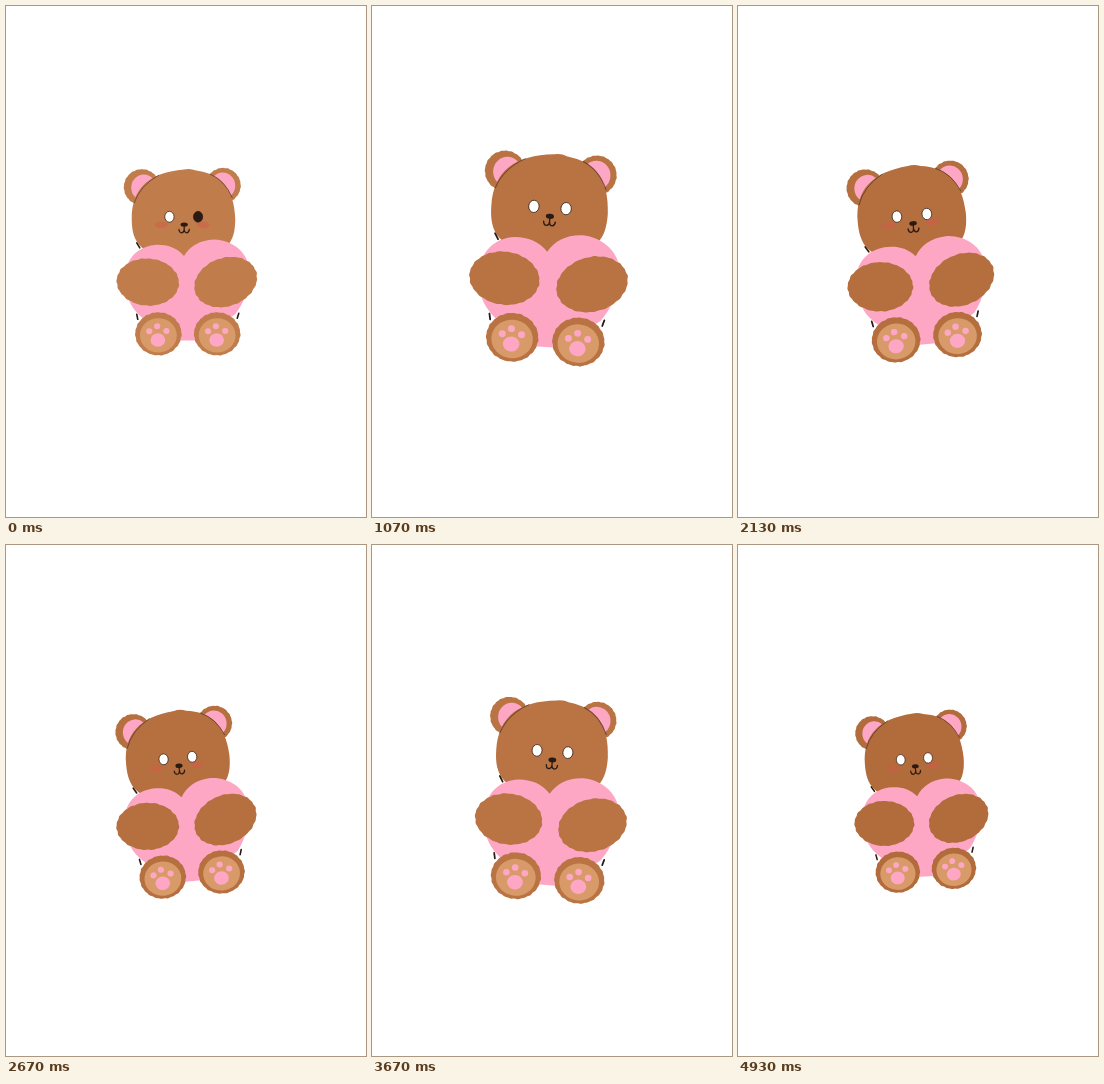
An HTML page that plays this animation: 360x511 px, repeating every 5000 ms.

```html
<!DOCTYPE html>
<html lang="en">
<head>
<meta charset="utf-8">
<title>Bear with a heart</title>
<style>
html, body { margin: 0; width: 100%; height: 100%; overflow: hidden; background: #fff; }
svg { display: block; width: 100vw; height: 100vh; }
</style>
</head>
<body>
<svg id="stage" viewBox="0 0 360 511">
  <g id="bear"></g>
</svg>
<script>
const LOOP = 5000, FPS = 15;
const BEAT = 888, FIRST_BEAT = 180;
const CX = 180, CY = 255.5;
const PINK = '#fda7c5', DARK = '#2a1a14';
const bear = document.getElementById('bear');

// time, rotation, x shift, y shift, warmth of the brown
const poses = [
  [0, 0, 0, 0, 1],
  [180, 0, 0, 0, 0.7],
  [600, 4, 1, -1.3, 0],
  [1070, 4, -3, -3.5, 0.5],
  [1470, -3.5, -2, -2.8, 0.8],
  [1960, -5, -2.5, 2.5, 0.4],
  [2130, -5, 2, -1, 0.2],
  [2670, -5, -2, 2, 0.3],
  [2850, -5, -1.4, 3, 0.3],
  [3200, -2, 2.4, 2.2, 0.2],
  [3730, 5, -1, -1, 0.6],
  [4200, 3, 2, -4.5, 0.8],
  [4620, 5, -4.6, 1, 0.4],
  [4930, -6.2, 3, 0.8, 0],
  [5000, 0, 0, 0, 1]
];

function add(tag, attrs) {
  const node = document.createElementNS('http://www.w3.org/2000/svg', tag);
  for (const key in attrs) node.setAttribute(key, attrs[key]);
  bear.append(node);
  return node;
}

const ellipse = (cx, cy, rx, ry, fill, more) => add('ellipse', { cx, cy, rx, ry, fill, ...more });
const shape = (d, fill, more) => add('path', { d, fill, ...more });
const line = (d, width, more) =>
  shape(d, 'none', { stroke: DARK, 'stroke-width': width, 'stroke-linecap': 'round', ...more });

// Ellipse with a slightly furry rim
function furry(cx, cy, rx, ry, tilt) {
  const a = tilt * Math.PI / 180, points = [];
  for (let i = 0; i < 120; i++) {
    const p = i * Math.PI / 60;
    const k = 1 + 0.009 * Math.sin(p * 23) + 0.006 * Math.sin(p * 14 + 1);
    const x = rx * k * Math.cos(p), y = ry * k * Math.sin(p);
    points.push((cx + x * Math.cos(a) - y * Math.sin(a)).toFixed(2) + ' ' +
                (cy + x * Math.sin(a) + y * Math.cos(a)).toFixed(2));
  }
  return shape('M' + points.join('L') + 'Z', 'currentColor');
}

function foot(x) {
  furry(x, 327.5, 23, 21.4, 0);
  ellipse(x, 329, 18.3, 17, '#d99a69');
  ellipse(x - 0.5, 333.5, 7.3, 6.7, PINK);
  ellipse(x - 9, 325, 3.1, 3, PINK);
  ellipse(x - 1.2, 320, 3.1, 3, PINK);
  ellipse(x + 8, 324.7, 3.1, 3, PINK);
}

// Ears and head
furry(136, 181.5, 17.8, 17.8, 0);
ellipse(138, 182, 12.5, 13, PINK);
furry(217, 179.8, 17.4, 17.4, 0);
ellipse(216.5, 180, 12.5, 13, PINK);
shape('M178 164Q184 162.5 190 165C214 168 228 182 229 213C229 236 222 252 178 252' +
      'C134 252 126 236 126 213C126 182 144 167 178 164Z', 'currentColor');
line('M128.5 197Q134 180 153 169.5M204 168.5Q219 175 226 192', 0.9, { opacity: 0.55 });
line('M131 237L134 242M131 308L132 313M232.5 307L231 312', 1.6);

// Face
const eyes = [163.5, 192].map(x =>
  ellipse(x, 211, 4.6, 5.4, '#fff', { stroke: DARK, 'stroke-width': 0.7 }));
const cheeks = [155.5, 197].map(x => ellipse(x, 219, 6.5, 3.4, '#d4584c', { opacity: 0.45 }));
ellipse(178.2, 218.8, 3.6, 2.2, DARK);
line('M178.2 220V223.5M173 223.5Q173.2 227 175.8 227Q178.2 226.6 178.2 223.5' +
     'Q178.4 227 180.8 227Q183.2 226.6 183.3 223.5', 1.2);

// Heart, arms and feet
shape('M178 250C170 241 160 238.5 149 239C128 241 117 258 119 279C122 297 128 304 137 312' +
      'L172 334H190L229 308C239 295 243 281 243 264C242 246 226 234 208 233.5C194 234 184 240 178 250Z', PINK);
furry(142, 276, 31, 23.4, 4);
furry(219.5, 276, 32, 24, -20);
foot(152.5);
foot(211);

const lerp = (a, b, k) => a + (b - a) * k;

function poseAt(t) {
  const i = poses.findIndex(p => p[0] > t);
  const from = poses[i - 1], to = poses[i];
  const k = (t - from[0]) / (to[0] - from[0]);
  return from.map((v, n) => lerp(v, to[n], k));
}

function scaleAt(t) {
  const phase = ((t - FIRST_BEAT) / BEAT + 2) % 1;
  const fromBeat = 2 * Math.min(phase, 1 - phase);
  return 0.855 + 0.28 * Math.pow(1 - fromBeat, 1.2);
}

function draw(ms) {
  const t = Math.floor((ms % LOOP) * FPS / 1000 + 0.01) * 1000 / FPS % LOOP;
  const [, turn, x, y, warmth] = poseAt(t);
  bear.setAttribute('transform',
    `translate(${CX + x} ${CY + y}) rotate(${turn}) scale(${scaleAt(t)}) translate(${-CX} ${-CY})`);
  bear.style.color = `rgb(${lerp(177, 193, warmth)}, ${lerp(106, 124, warmth)}, ${lerp(58, 76, warmth)})`;
  cheeks.forEach(c => c.setAttribute('visibility', turn > 1 ? 'hidden' : 'visible'));
  eyes[1].setAttribute('fill', t < 130 ? DARK : '#fff');
}

const start = performance.now();
function tick() {
  draw(performance.now() - start);
  requestAnimationFrame(tick);
}
tick();
</script>
</body>
</html>
```
